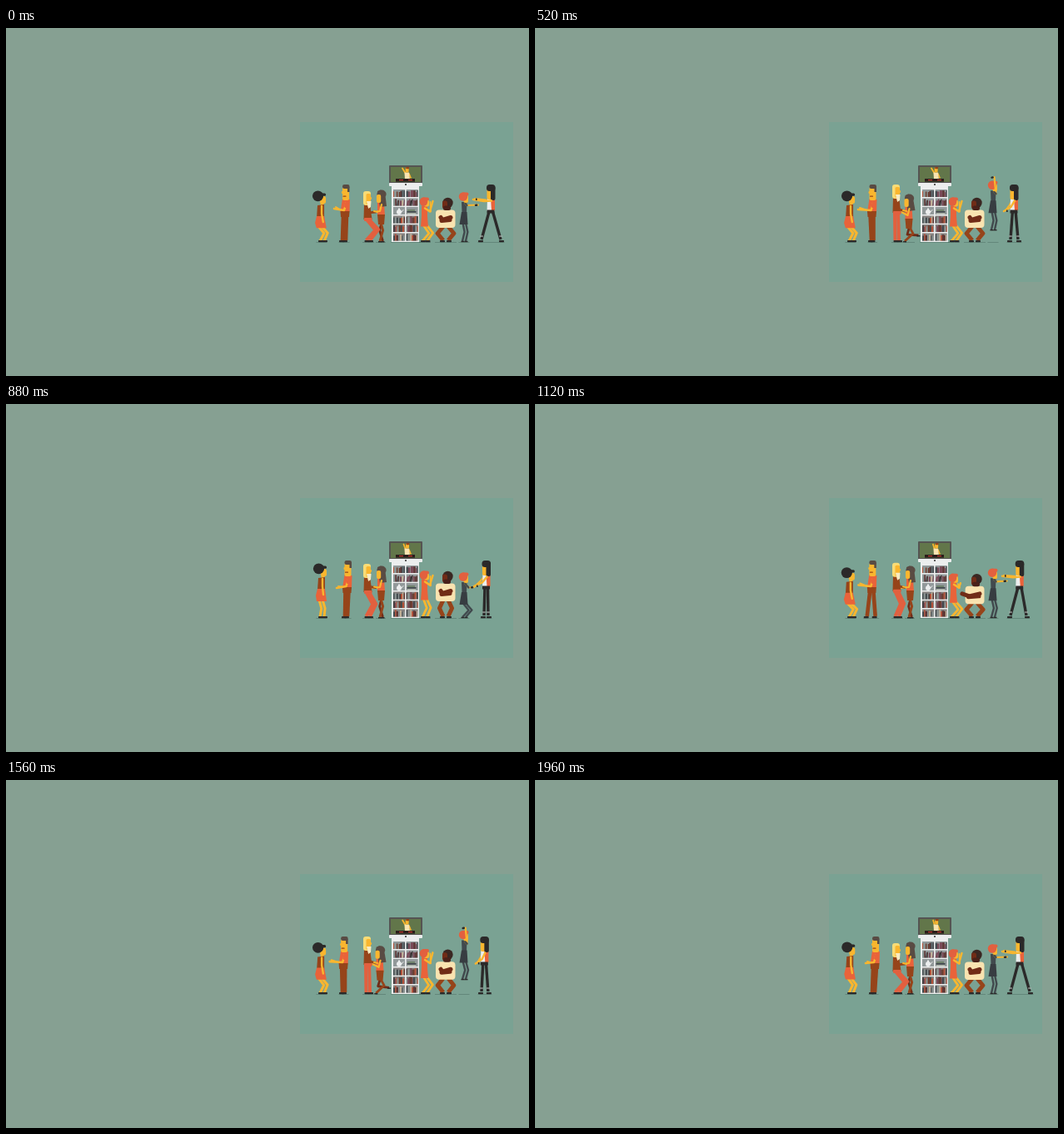
Animation of 628x418 px, one loop 2000 ms. Source, as an HTML page:

```html
<!DOCTYPE html>
<html lang="en">
<head>
<meta charset="utf-8">
<title>Dance party</title>
<style>
html, body { margin: 0; width: 100%; height: 100%; overflow: hidden; background: #86a092; }
svg { display: block; width: 100%; height: 100%; }
</style>
</head>
<body>
<svg viewBox="0 0 628 418"><g id="room"></g><g id="crowd"></g></svg>
<script>
const SKIN = '#f9b62f', ORANGE = '#e9633a', BROWN = '#96441a', DARK = '#2b2929', RED = '#e2603f',
      WHITE = '#eceeee', SLATE = '#41494d', CREAM = '#f9e3b0', COCOA = '#712c17', HAIR = '#594b43';
const LOOP = 2000, BEAT = 1000, STEP = 40, FLOOR = 257;
const KEYS = [0, .2, .36, .52, .8, .88, .96];

const box = (x, y, w, h, fill, r = 0) =>
  `<rect x="${x}" y="${y}" width="${w}" height="${h}" rx="${r}" fill="${fill}"/>`;
const oval = (x, y, rx, ry, fill) => `<ellipse cx="${x}" cy="${y}" rx="${rx}" ry="${ry}" fill="${fill}"/>`;
const shape = (points, fill) => `<polygon points="${points.join(' ')}" fill="${fill}"/>`;
const line = (points, color, width, cap = 'round') =>
  `<polyline points="${points.join(' ')}" fill="none" stroke="${color}" stroke-width="${width}" stroke-linecap="${cap}" stroke-linejoin="round"/>`;

// Two equal bones between a and b; side picks the way the joint bends.
function limb(a, b, length, side, color, width) {
  const dx = b[0] - a[0], dy = b[1] - a[1], d = Math.hypot(dx, dy) || 1;
  const h = side * Math.sqrt(Math.max(0, length * length - d * d)) / 2;
  const joint = [(a[0] + b[0]) / 2 + dy / d * h, (a[1] + b[1]) / 2 - dx / d * h];
  return line([a, joint, b], color, width, 'butt');
}
const shoe = (x, y = FLOOR, toe = 1) => box(x - (toe > 0 ? 2 : 4), y - 2, 6, 2.2, DARK, .8);
const shadow = (x, w) => box(x - w / 2, FLOOR, w, .9, 'rgba(50,75,68,.35)');

// Monotone cubic through one value per key, wrapping at the beat.
function track(values, p) {
  const n = KEYS.length;
  const time = i => KEYS[(i + n) % n] + Math.floor(i / n);
  const value = i => values[(i + n) % n];
  const rise = i => (value(i + 1) - value(i)) / (time(i + 1) - time(i));
  const slope = i => {
    const a = rise(i - 1), b = rise(i);
    return a * b <= 0 ? 0 : 2 * a * b / (a + b);
  };
  let i = n - 1;
  while (KEYS[i] > p) i--;
  const span = time(i + 1) - time(i), u = (p - time(i)) / span, v = 1 - u;
  return value(i) * v * v * (1 + 2 * u) + value(i + 1) * u * u * (3 - 2 * u)
    + span * u * v * (slope(i) * v - slope(i + 1) * u);
}

function afroWoman(k) {
  const d = k([.8, 1, 1, .8, 0, 0, .6]), y = 5 * d, x = 376 - 1.2 * d;
  return shadow(379, 13)
    + limb([x, 235 + y * .8], [377, 256], 21.5, 1, SKIN, 3)
    + limb([x + 4, 235 + y * .8], [382, 256], 21.5, 1, SKIN, 3)
    + shoe(377) + shoe(382)
    + box(x + 2.5, 203 + y, 4, 8, SKIN)
    + shape([[x - 1, 209 + y], [x + 7, 208 + y], [x + 7, 224 + y], [x - 2, 224 + y]], BROWN)
    + shape([[x - 2, 222 + y], [x + 7, 222 + y], [x + 9 + d, 237 + y * .8], [x - 3 + d, 237 + y * .8], [x - 4, 230 + y]], ORANGE)
    + line([[x + 4, 210 + y], [x + 4, 219 + y], [x + 5 + d, 229 + y]], SKIN, 2.4)
    + box(x + 2, 198 + y, 7, 9, SKIN, 2.5)
    + oval(x - .5, 197.8 + y, 6.6, 6.4, DARK)
    + box(x + 1, 194.5 + y, 8, 3.2, DARK, 1.5);
}

function vestMan(k) {
  const head = k([408, 404.5, 404.5, 405.5, 411.5, 410.5, 409]);
  const hip = k([407, 403.5, 403.5, 404.5, 410.5, 409.5, 408]);
  const left = k([404, 396.5, 396, 404, 404, 407, 405]);
  const right = k([408, 409, 409, 406.5, 415, 410, 408]);
  const hand = [k([394, 386.5, 386, 388, 394, 397, 397]), k([217, 218, 219, 218, 221, 221, 220])];
  return shadow((left + right) / 2, right - left + 9)
    + line([[hip - 2, 224], [left, 255]], BROWN, 4.6, 'butt')
    + line([[hip + 2, 224], [right, 255]], BROWN, 4.6, 'butt')
    + shoe(left, FLOOR, -1) + shoe(right, FLOOR, -1)
    + line([[head - 1, 209], [head - 4, 220], [hand[0] + 2, hand[1] - 2]], SKIN, 2)
    + shape([[head - 4, 205], [head + 5, 206], [hip + 5.5, 221], [hip - 5.5, 221]], ORANGE)
    + shape([[hip - 5.5, 220], [hip + 5.5, 220], [hip + 5, 227], [hip - 5, 227]], BROWN)
    + line([[head + 1, 209], [head - 2, 219], hand], SKIN, 2.6)
    + line([[head + 2, 208], [head, 214]], ORANGE, 4)
    + box(head - 4, 191, 8, 16, SKIN, 2)
    + box(head - 5, 196, 2, 3, SKIN, 1)
    + box(head - 4, 188, 8.5, 5, HAIR, 2.2)
    + box(head + 2, 191, 2.5, 6, HAIR)
    + box(head - 3.5, 201.5, 4, 1.2, BROWN, .5);
}

function blondMan(k) {
  const d = k([1, 0, 0, 0, 0, .5, 1]), y = 8 * d;
  return shadow(435, 14)
    + limb([432 + d, 222 + y], [432.5, 255], 33, 1, RED, 4)
    + limb([436, 222 + y], [437, 255], 33, 1, RED, 4)
    + shoe(432.5) + shoe(437)
    + shape([[430, 204 + y], [437, 203 + y], [439.5, 222 + y], [429.5, 222 + y]], BROWN)
    + box(430, 220 + y, 9.5, 4, RED, 1)
    + box(429, 188 + y, 9, 17, '#f8dc76', 3)
    + box(432.5, 191 + y, 5.5, 13, SKIN, 1.5)
    + box(437, 195 + y, 2, 3, SKIN, 1)
    + shape([[433, 200 + y], [438.5, 200 + y], [438, 207 + y], [435, 209 + y]], '#f8ebc3')
    + line([[433, 208 + y], [435, 217 + y * .6], [444, 220 + d]], BROWN, 2.8)
    + line([[442, 219 + d], [446, 220 + d]], SKIN, 2);
}

function longHairWoman(k) {
  const d = k([0, 0, .3, 1, .15, 0, 0]), y = 5 * d, lean = -1.5 * d;
  const back = [452.5 + k([0, 0, 0, 8, 0, 0, 0]), 256 - k([0, 0, 0, 7, 0, 0, 0])];
  const front = [449 - k([0, 0, 0, 5, 0, 0, 0]), 256];
  const x = 450 + lean;
  return shadow(450, 12)
    + limb([x + 2, 230 + y], back, 27, -1, COCOA, 2.8)
    + limb([x - 1, 230 + y], front, 27, 1, BROWN, 2.8)
    + box(back[0] - 2, back[1], 4, 1.5, DARK) + box(front[0] - 2, 256, 4, 1.5, DARK)
    + shape([[x - 4, 210 + y], [x + 4, 210 + y], [x + 5, 226 + y], [x - 4, 226 + y]], ORANGE)
    + shape([[x - 4, 224 + y], [x + 5, 224 + y], [x + 4, 236 + y], [x - 3, 236 + y]], BROWN)
    + shape([[x - 4, 196 + y], [x, 194.5 + y], [x + 5, 197 + y], [x + 7 + d, 214 + y], [x - 1, 215 + y]], HAIR)
    + oval(x + 1, 199.5 + y, 5.6, 5, HAIR)
    + box(x - 5, 200 + y, 5.2, 10, SKIN, 2)
    + line([[x + 1, 212 + y], [x - 1, 220 + y], [440, 221]], SKIN, 2.2);
}

function dressWoman(k) {
  const y = k([4.5, 5, 5, 4.5, 0, 1.5, 4.5]), x = 502;
  const hand = [k([512.5, 510, 511, 512.5, 511, 512.5, 512.5]), k([208, 219, 216, 208, 205, 206, 208])];
  return shadow(503, 14)
    + limb([x - 1, 232 + y], [500, 256], 24.5, 1, SKIN, 2.8)
    + limb([x + 3, 232 + y], [505.5, 256], 24.5, 1, SKIN, 2.8)
    + shoe(500) + shoe(505.5)
    + line([[x + 3, 213 + y], [x + 8, 217 + y * .8], [hand[0] - 3, hand[1] + 1]], SKIN, 1.8)
    + shape([[x - 3, 209 + y], [x + 4, 209 + y], [x + 4, 222 + y], [x + 5, 234 + y], [x - 4, 234 + y], [x - 3, 221 + y]], ORANGE)
    + box(x, 202 + y, 6, 8, SKIN, 2)
    + oval(x - .5, 204 + y, 4.8, 5.2, RED)
    + box(x - 2, 199 + y, 8, 4, RED, 2)
    + line([[x + 1, 212 + y], [x + 7, 216 + y], hand], SKIN, 2.4);
}

function sweaterMan(k) {
  const y = k([4.5, 5, 4.5, 4.5, 0, 1.5, 4.5]), reach = k([0, 1, .5, 0, 0, 0, 0]);
  return shadow(528, 26)
    + limb([525, 234 + y], [525, 255], 21.5, -1, BROWN, 5)
    + limb([531, 234 + y], [531, 255], 21.5, 1, BROWN, 5)
    + shoe(525, FLOOR, -1) + shoe(531)
    + box(516 + reach, 214 + y, 23.5 - reach, 21.5, CREAM, 4)
    + line([[534, 223 + y], [524 - 4 * reach, 226 + y], [522 - 14 * reach, 223 + y]], COCOA, 5)
    + line([[533, 226 + y], [523 - 4 * reach, 227 + y]], COCOA, 5)
    + oval(530.5, 205.5 + y, 6.2, 6.3, '#3a2722')
    + box(524, 203 + y, 6, 10, COCOA, 2.4)
    + box(525, 209 + y, 9, 5.5, '#4a2119', 2.5);
}

function jumper(k, p) {
  const lift = Math.max(0, 19 * (1 - ((p - .63) / .21) ** 2));
  const drop = k([0, .5, 5, 0, 6, 5, 0]), y = drop - lift, foot = 256 - lift;
  const hand = [k([567, 566, 557, 551.5, 557, 562, 567]), k([212.5, 212.5, 223, 193, 220, 220, 212.5]) - lift];
  const x = 549.5;
  return shadow(550, 13)
    + limb([x - 1, 234 + y], [548, foot], 22.5, 1, SLATE, 2.4)
    + limb([x + 2.5, 234 + y], [552, foot], 22.5, 1, SLATE, 2.4)
    + box(546.5, foot - .2, 4, 1.4, DARK) + box(550.5, foot - .2, 4, 1.4, DARK)
    + shape([[x - 2.5, 209 + y], [x + 4, 209 + y], [x + 3.5, 222 + y], [x - 2, 222 + y]], SLATE)
    + shape([[x - 2.5, 221 + y], [x + 4, 221 + y], [x + 5, 236 + y], [x - 5, 236 + y]], '#373c41')
    + box(x, 201 + y, 5.5, 9, SKIN, 2)
    + oval(x - .5, 202.5 + y, 5.2, 5.2, RED)
    + box(x - 2, 197.5 + y, 8, 4, RED, 2)
    + line([[x + 2, 211 + y], [x + 4 + drop * .4, 213 + y + drop * .5], hand], SKIN, 2.2)
    + line([[x + 2, 211 + y], [x + 4 + drop * .4, 213 + y + drop * .5]], SLATE, 2.4)
    + line([[hand[0] - 3, hand[1] + .4], [hand[0] - 1.8, hand[1] + .2]], DARK, 2.4);
}

function tallMan(k, t) {
  const widest = t > 700 && t < 1720 ? 590 : 594;
  const x = k([582, 581.5, 581, 575, 572, 576.5, 582]);
  const left = k([571, 571, 576, 571, 571, 574, 571]);
  const right = Math.min(widest, k([594, 594, 593, 580, 575, 579, 594]));
  const hand = [k([561, 561, 561, 563, 570, 562, 561]), k([206, 207, 207, 220, 222, 219, 206])];
  const leg = foot => line([[x + (foot === left ? -1.5 : 2), 219], [foot, 254]], DARK, 3.4, 'butt')
    + box(foot - 1.8, 249.5, 3.6, 1.1, '#bdc4c0') + shoe(foot, FLOOR, foot === left ? -1 : 1);
  const shoulder = [x + 1, 207.5];
  const elbow = [(shoulder[0] + hand[0]) / 2 + 2, (shoulder[1] + hand[1]) / 2 + 1.2];
  return shadow((left + right) / 2, right - left + 9)
    + leg(right) + leg(left)
    + line([[x - 2, 207], [elbow[0] - 2, elbow[1] - 2], [hand[0] + 2, hand[1] - 1]], SKIN, 1.8)
    + shape([[x - 4, 205], [x + 4, 205], [x + 4.5, 220], [x - 4.5, 220]], WHITE)
    + shape([[x, 205], [x + 5, 205], [x + 5, 219], [x + 1, 219]], ORANGE)
    + box(x - 4.5, 218.5, 9, 4, DARK)
    + box(x - 4.5, 192, 7, 14, SKIN, 2)
    + box(x - 5, 188, 10.5, 8, DARK, 3.5)
    + box(x, 190, 5.5, 17, DARK, 2)
    + line([shoulder, elbow, hand], SKIN, 2.5)
    + line([[hand[0] + 3, hand[1] - .2], [hand[0] + 4.6, hand[1] - .3]], DARK, 2.6, 'butt');
}

function screenDancer(k) {
  const s = k([-1, 1, -1, -1, 1, 0, .4]);
  return line([[480, 175], [477.5 + s * 1.5, 168.5]], SKIN, 1.8)
    + line([[484, 175], [486, 180]], SKIN, 1.6)
    + shape([[478.5, 173.5], [484, 173.5], [485, 182], [479, 182]], CREAM)
    + box(480 + s * .4, 167.5, 4, 6, SKIN, 1.5)
    + box(480.5 + s * .4, 167, 4, 2.2, BROWN, 1)
    + box(468, 181, 23, 3.6, '#2a1d1b')
    + box(472, 182, 5, 1.2, '#c23a2d') + box(483, 182, 5, 1.2, '#c23a2d');
}

function room() {
  let seed = 11;
  const rnd = () => (seed = seed * 16807 % 2147483647) / 2147483647;
  const spines = [SLATE, '#6d3a2a', '#b4523a', '#5b3230', '#8b9694', '#c9b79a', '#3b3334', '#7a4a58'];
  let out = box(353, 113, 256, 192, '#7aa293')
    + box(460, 165, 40, 21.5, '#555452', 1) + box(462, 167, 36, 18, '#62764a')
    + box(460, 186, 40, 4, WHITE, 1) + oval(480, 188, 1, 1, DARK)
    + shadow(480, 36) + box(463, 190, 33, 67, WHITE);
  for (let row = 0; row < 6; row++) {
    const top = 194 + row * 10.5, floor = top + 9;
    for (const left of [465, 480.7]) {
      out += box(left, top, 14, 9, row < 3 ? '#92999a' : '#85817f');
      if (row === 2) continue;
      for (let x = left; x < left + 13;) {
        const w = Math.min(1 + rnd() * 1.4, left + 14 - x), h = 5.8 + rnd() * 2.6;
        const lean = row === 1 && rnd() < .5 ? 1.2 : 0;
        out += shape([[x, floor], [x + w, floor], [Math.min(x + w + lean, left + 14), floor - h], [x + lean, floor - h]],
          spines[Math.floor(rnd() * spines.length)]);
        x += w + (rnd() < .2 ? .7 : 0);
      }
    }
  }
  return out
    + oval(472, 221, 3, 3, WHITE) + box(471, 216.5, 2, 3, WHITE) + line([[475, 221], [477, 218.5]], WHITE, 1)
    + box(482, 218, 9, 1.8, '#6c8068') + box(481.5, 220, 11, 1.8, SLATE) + box(482, 222, 10, 1.8, '#b6bdb4');
}

const crowd = document.getElementById('crowd');
const people = [screenDancer, afroWoman, vestMan, longHairWoman, blondMan, dressWoman, sweaterMan];

function draw(t) {
  const p = t % BEAT / BEAT;
  const k = values => track(values, p);
  crowd.innerHTML = people.map(person => person(k)).join('') + jumper(k, p) + tallMan(k, t);
}

document.getElementById('room').innerHTML = room();
const start = performance.now();
let shown = -1;
function tick() {
  const t = Math.floor((performance.now() - start) % LOOP / STEP) * STEP;
  if (t !== shown) draw(shown = t);
  requestAnimationFrame(tick);
}
tick();
</script>
</body>
</html>
```
